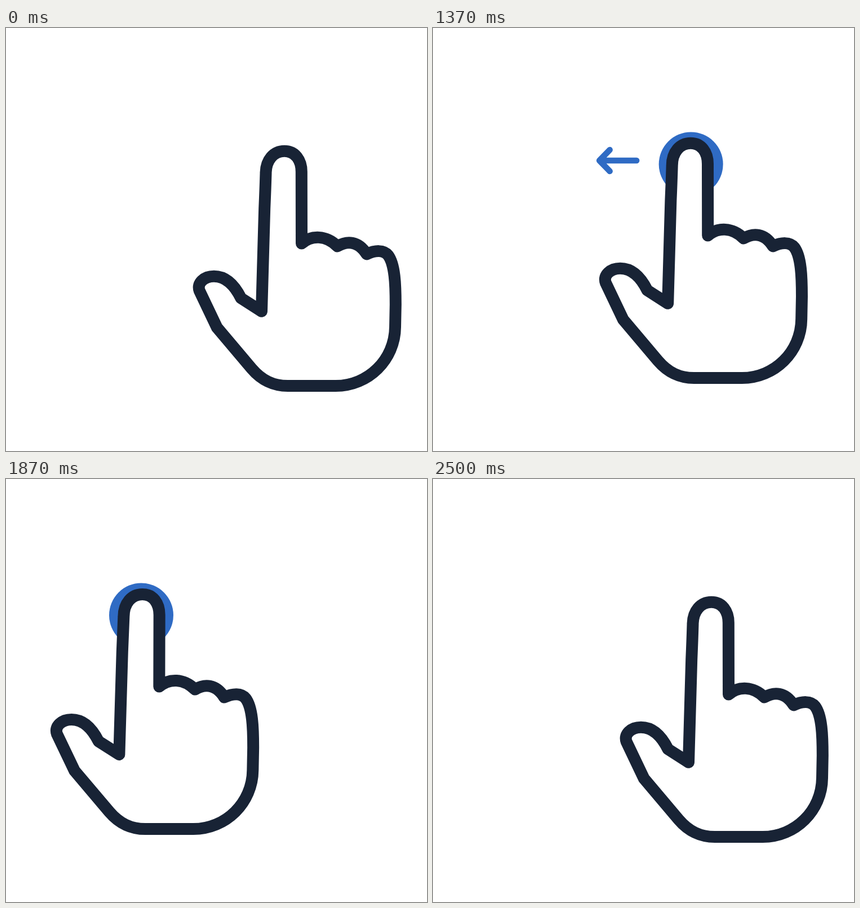
Animation, 747 px wide and 750 px high, one loop 2860 ms. Source, as an HTML page:

```html
<!DOCTYPE html>
<html lang="en">
<head>
<meta charset="utf-8">
<title>Swipe left gesture</title>
<style>
  html, body { margin: 0; width: 100%; height: 100%; overflow: hidden; background: #fff; }
  svg { display: block; width: 747px; height: 750px; }
  path { stroke-linecap: round; stroke-linejoin: round; }
  #hand { fill: #fff; stroke: #182335; stroke-width: 21; }
  #arrow { fill: none; stroke: #2f6bc4; stroke-width: 10.5; }
  #dot { fill: #2f6bc4; }
</style>
</head>
<body>
<svg viewBox="0 0 747 750">
  <circle id="dot" cy="241.5"/>
  <path id="arrow"/>
  <path id="hand"/>
</svg>
<script>
const LOOP = 2860, FPS = 30;
const PRESS = { x: -34, y: -14 };
const SWIPE = -220.5, ARROW_RUN = -231;
const [dot, arrow, hand] = ['dot', 'arrow', 'hand'].map(id => document.getElementById(id));

const part = (f, a, b) => Math.min(1, Math.max(0, (f - a) / (b - a)));
const ease = (f, a, b) => { const t = part(f, a, b); return t * t * (3 - 2 * t); };

// Hand outline; b leans the finger and drops the thumb.
function handPath(b) {
  const p = (x, y, dx = 0, dy = 0) => `${x + dx * b},${y + dy * b} `;
  return 'M' + p(453.5, 502.3, 0, 1) +
    'L' + p(458.7, 320, 8.5) +
    'Q' + p(460.2, 285, 11.5) + p(461, 258, 18, -3) +
    'C' + p(461, 234, 22, -3) + p(475, 218.3, 22, 1) + p(494, 218.3, 22, 1) +
    'C' + p(513, 218.3, 22, 1) + p(524.3, 234, 20) + p(524.3, 255, 18.5) +
    'L' + p(524.5, 382) +
    'C542,367 568,367 588,387 C605,377 625,377 640,401' +
    'C655,394 670,393 678,403 C690,419 691.3,455 691.3,490' +
    'L690.5,530 C690,588 643,634.5 585,634.5 H500 C474,634.5 454,625 436,604' +
    'L' + p(374.3, 531, -1.5, 4) +
    'L' + p(343.3, 466, -6, 5) +
    'C' + p(338, 452, -6, 5) + p(352, 440.3, -5, 5) + p(369, 440.3, -5, 5) +
    'C' + p(390, 440.3, -5, 5) + p(405, 455, -4, 3) + p(417, 479, -4, 2) + 'Z';
}

// Shaft draws right to left, then both wings open from the tip.
function arrowPath(shaft, wing) {
  const tip = 297.5, y = 235, tail = 363.5;
  let d = shaft > 0 ? `M${tail},${y}H${tail + (tip - tail) * shaft}` : '';
  if (wing > 0) {
    const x = tip + 18.5 * wing, h = 19 * wing;
    d += `M${x},${y - h}L${tip},${y}L${x},${y + h}`;
  }
  return d;
}

function draw(ms) {
  const f = Math.floor(ms * FPS / 1000 + 0.11);
  const press = ease(f, 0, 17), swipe = SWIPE * ease(f, 40, 55);
  const back = 1 - ease(f, 55, 75);
  const bend = f < 65 ? ease(f, 55, 65) : 1 - ease(f, 65, 75);

  hand.setAttribute('d', handPath(bend));
  hand.setAttribute('transform',
    `translate(${(PRESS.x * press + swipe) * back} ${PRESS.y * press * back})`);

  dot.setAttribute('cx', 460.5 + swipe);
  dot.setAttribute('r', 57 * ease(f, 16, 20) * (1 - ease(f, 56, 60)));

  arrow.setAttribute('d', arrowPath(part(f, 20, 32), part(f, 32, 37)));
  arrow.setAttribute('transform', `translate(${ARROW_RUN * ease(f, 40, 57)} 0)`);
  arrow.setAttribute('opacity', 1 - part(f, 51, 56));
}

const start = performance.now();
function tick() {
  draw((performance.now() - start) % LOOP);
  requestAnimationFrame(tick);
}
tick();
</script>
</body>
</html>
```
